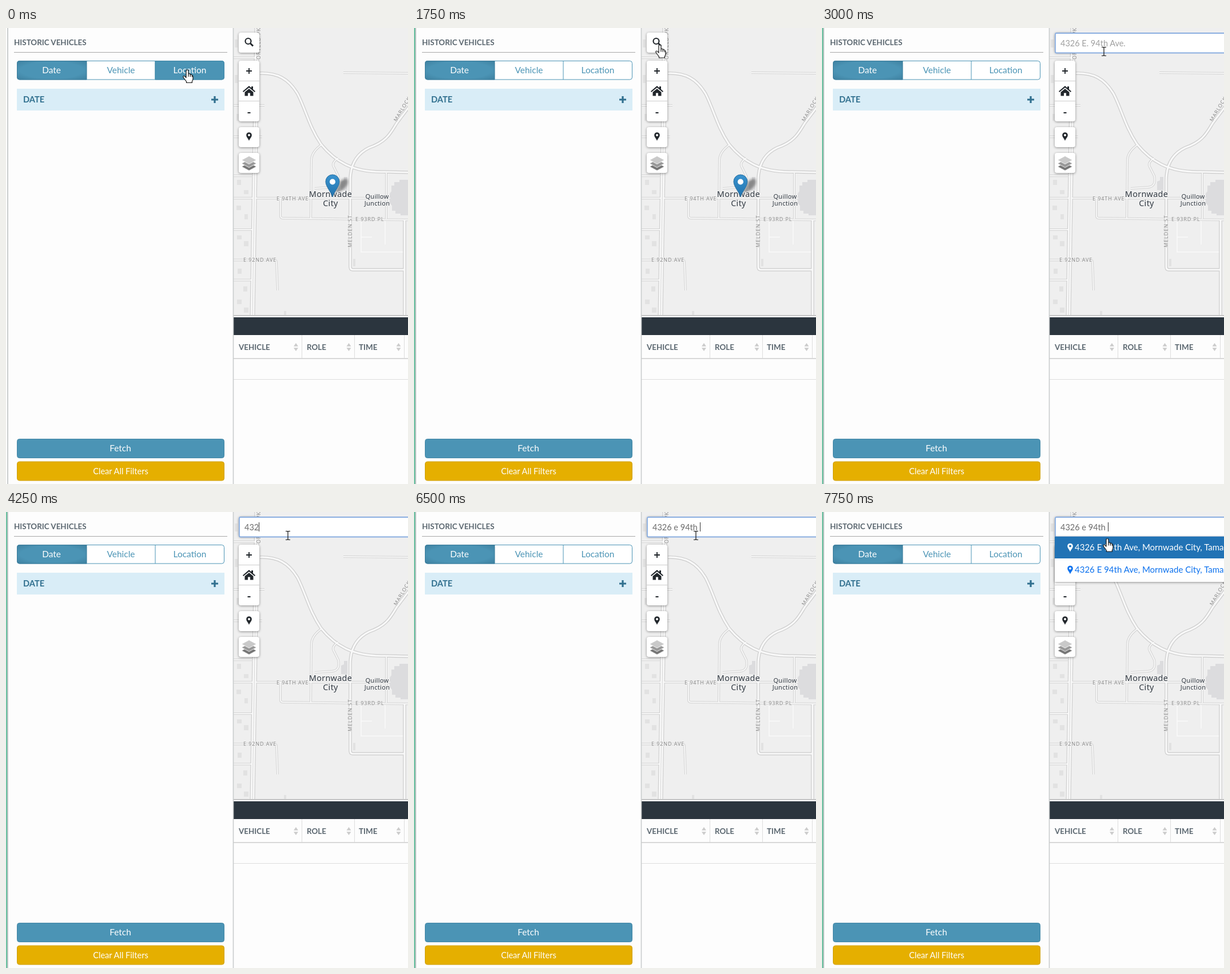
Recreate the animation shown at these times as an HTML page. Size 703 px wide and 796 px high, loop 8000 ms.

```html
<!DOCTYPE html>
<html lang="en">
<head>
<meta charset="utf-8">
<title>Historic vehicles</title>
<style>
html, body { margin: 0; width: 100%; height: 100%; overflow: hidden; background: #fdfdfd; }
svg { display: block; width: 703px; height: 796px; }
text { font-family: Lato, "Open Sans", sans-serif; white-space: pre; }
.mid { text-anchor: middle; }
.btn { font-size: 15.4px; fill: #4b94b5; }
.white { fill: #fff; }
.head { font-size: 13.4px; font-weight: 700; fill: #5b6770; }
.field { font-size: 14.5px; }
.item { font-size: 15px; }
.map text { font-family: "Noto Sans", sans-serif; fill: #333b44; letter-spacing: .3px;
  paint-order: stroke; stroke: #efefef; stroke-width: 2px; }
.map .street { font-size: 9px; letter-spacing: .9px; fill: #8c8c8c; }
.ctl { fill: #fff; filter: drop-shadow(0 1px 2px #0006); }
.ink { fill: #22272c; }

.hover, .marker, .stripe, .input, .field-box, .hand, .beam, .list, .picked {
  animation: 8s step-end infinite;
}
.hover { animation-name: hover; }
.marker { animation-name: marker; }
.stripe { animation-name: stripe; }
.input { animation-name: input; }
.field-box { animation-name: grow; }
.hand { animation-name: hand; }
.beam { animation-name: beam; }
.list { animation-name: list; }
.picked { animation-name: picked; }

@keyframes hover { 0% { opacity: 1; } 12.5%, 100% { opacity: 0; } }
@keyframes marker { 0% { opacity: 1; } 25%, 100% { opacity: 0; } }
@keyframes stripe { 0% { fill: #fdfdfd; } 21.875%, 100% { fill: #6ec2a2; } }
@keyframes input { 0% { opacity: 0; } 25%, 100% { opacity: 1; } }
@keyframes grow { 0% { width: 237px; } 28.125%, 100% { width: 310px; } }
@keyframes list { 0% { opacity: 0; } 84.375%, 100% { opacity: 1; } }
@keyframes picked { 0% { opacity: 0; } 96.875%, 100% { opacity: 1; } }
@keyframes hand {
  0% { transform: translate(317px, 73px); opacity: 1; }
  9.375% { transform: translate(366px, 60px); }
  12.5% { transform: translate(418px, 35.5px); }
  15.625% { transform: translate(428px, 33px); }
  18.75% { transform: translate(430px, 29.5px); opacity: 1; }
  25% { transform: translate(499px, 46.5px); opacity: 0; }
  96.875%, 100% { transform: translate(499px, 46.5px); opacity: 1; }
}
@keyframes beam {
  0% { transform: translate(432px, 40px); opacity: 0; }
  25% { transform: translate(432px, 40px); opacity: 1; }
  28.125% { transform: translate(493px, 41px); opacity: 0; }
  31.25% { transform: translate(493px, 41px); opacity: 1; }
  96.875%, 100% { transform: translate(493px, 41px); opacity: 0; }
}
</style>
</head>
<body>
<svg viewBox="0 0 703 796">
  <defs>
    <clipPath id="mapArea"><path d="M398 0H703V501H398Z"/></clipPath>
    <radialGradient id="pressed" cx=".5" cy=".5" r=".75">
      <stop offset=".6" stop-color="#4b94b5"/><stop offset="1" stop-color="#3b7c9b"/>
    </radialGradient>
    <linearGradient id="blue" x2="0" y2="1">
      <stop stop-color="#3a93cf"/><stop offset="1" stop-color="#2273ad"/>
    </linearGradient>
    <filter id="blur"><feGaussianBlur stdDeviation="2"/></filter>
    <path id="pin" fill-rule="evenodd" d="M0 7.5C-1 4-4.8 1.2-4.8-2.5A4.8 4.8 0 0 1 4.8-2.5C4.8 1.2 1 4 0 7.5ZM-2-2.5A2 2 0 0 0 2-2.5A2 2 0 0 0-2-2.5Z"/>
    <path id="sort" fill="#ccc" d="M-4-1.3L0-7L4-1.3ZM-4 1.3L0 7L4 1.3Z"/>
    <g id="major">
      <path d="M444 79C474 78 494 88 510 115C524 142 530 172 551 203C575 232 605 252 660 251L703 252"/>
      <path d="M697 422H607Q602 422 602 417V266C602 240 612 220 635 209C668 198 674 180 684 165L709 132"/>
      <path d="M697 501V335"/>
    </g>
    <g id="minor">
      <path d="M590 78L703 79"/>
      <path d="M553 203Q535 215 534 230L533 332"/>
      <path d="M581 227Q569 235 573 242L581 258Q585 277 570 278L540 280"/>
      <path d="M398 297H601M601 297H672"/>
      <path d="M480 298V328Q480 332 485 332L703 335"/>
      <path d="M665 253V333"/>
      <path d="M398 405H470Q473 405 473 410L475 458"/>
      <path d="M398 258H430M398 352H432M398 440H430M398 135H452M398 190H448M398 52H440"/>
    </g>
  </defs>

  <!-- filter panel -->
  <rect width="703" height="796" fill="#fdfdfd"/>
  <rect class="stripe" width="2.5" height="796"/>
  <path d="M3 0V796" stroke="#a9adae" stroke-width="1.2"/>
  <text class="head" x="14" y="30">HISTORIC VEHICLES</text>
  <path d="M14 42.5H387" stroke="#a8a8a8"/>
  <rect x="19.5" y="57.5" width="362" height="32.5" rx="4" fill="#fff" stroke="#4b94b5"/>
  <path d="M141 57.5H23.5Q19.5 57.5 19.5 61.5V86Q19.5 90 23.5 90H141Z" fill="url(#pressed)" stroke="#3b7c9b"/>
  <path d="M261 57V90" stroke="#4b94b5"/>
  <text class="btn mid white" x="79.5" y="79">Date</text>
  <text class="btn mid" x="201" y="79">Vehicle</text>
  <text class="btn mid" x="321.5" y="79">Location</text>
  <g class="hover">
    <path d="M261 57.5H377.5Q381.5 57.5 381.5 61.5V86Q381.5 90 377.5 90H261Z" fill="#4b94b5" stroke="#3f87a8"/>
    <text class="btn mid white" x="321.5" y="79">Location</text>
  </g>
  <rect x="19" y="106" width="363" height="38" fill="#d9edf7"/>
  <text x="30" y="130" font-size="14.7" font-weight="700" fill="#31708f">DATE</text>
  <path d="M359 125H371M365 119V131" stroke="#31708f" stroke-width="3.2"/>
  <rect x="19.5" y="717.5" width="362" height="33" rx="4" fill="#4b94b5" stroke="#4286a5"/>
  <text class="btn mid white" x="200" y="739">Fetch</text>
  <rect x="19.5" y="757" width="362" height="33" rx="4" fill="#e5af00" stroke="#cf9f06"/>
  <text class="btn mid white" x="200.5" y="778.5" style="font-size:14.6px">Clear All Filters</text>

  <!-- map -->
  <g class="map" clip-path="url(#mapArea)">
    <rect x="398" width="305" height="501" fill="#efefef"/>
    <g fill="#e2e2e2">
      <path d="M404 265h7v9h-7zM416 283h8v7h-8zM403 310h8v8h-8zM417 325h6v9h-6zM404 362h8v7h-8zM416 372h8v9h-8zM405 420h7v9h-7zM415 451h7v9h-7zM404 474h8v8h-8zM416 488h8v9h-8zM403 150h4v12h-4zM400 20h5v14h-5zM400 82h5v14h-5z"/>
      <path d="M607 403h4v13h-4zM486 494h4v7h-4z"/>
      <path fill="#dcdcde" d="M586 268l5-2v-6h6v23h-11zM703 265h-15v4h-9v6h-5v10l-3 4v17l4 4v9h6v5h9v3h13z"/>
    </g>
    <path d="M621 338V391H697M663 336V378M621 365H640" fill="none" stroke="#fafafa" stroke-width="1.5"/>
    <g fill="none">
      <path id="avenue" d="M439 0L435 250L431 501" stroke="#cfcfcf" stroke-width="9"/>
      <use href="#minor" stroke="#d2d2d2" stroke-width="4"/>
      <use href="#major" stroke="#cbcbcb" stroke-width="5.5"/>
      <path d="M439 0L435 250L431 501" stroke="#f8f8f8" stroke-width="6.6"/>
      <use href="#minor" stroke="#f8f8f8" stroke-width="2"/>
      <use href="#major" stroke="#f8f8f8" stroke-width="3.2"/>
      <path d="M439 0L435 250L431 501" stroke="#d6d6d6"/>
    </g>
    <text class="street" x="473" y="300.5">E 94TH AVE</text>
    <text class="street" x="611" y="337">E 93RD PL</text>
    <text class="street" x="415" y="408">E 92ND AVE</text>
    <text class="street" transform="translate(605 383) rotate(-90)">MELDEN ST</text>
    <text class="street" transform="translate(683 164) rotate(-59)">MARLOCK RD</text>
    <text class="street" transform="translate(444.5 55) rotate(-90)">ORVELD PKWY</text>
    <g class="marker">
      <path d="M572 293L585 267Q596 259 598 267Q599 277 583 286Z" fill="#000" opacity=".38" filter="url(#blur)"/>
    </g>
    <g class="mid">
      <text x="567.5" y="294.5" font-size="14.4">Mornwade</text>
      <text x="567.5" y="311" font-size="14.4">City</text>
      <text x="649" y="297.5" font-size="11">Quillow</text>
      <text x="649" y="309.5" font-size="11">Junction</text>
    </g>
    <g class="marker">
      <path d="M571 295C568 285 559 277 559 268A12 12 0 0 1 583 268C583 277 574 285 571 295Z" fill="url(#blue)" stroke="#2a6f9f"/>
      <circle cx="571" cy="268.5" r="5" fill="#fff"/>
    </g>
  </g>

  <!-- map controls -->
  <rect class="ctl" x="407" y="8" width="36" height="35" rx="4"/>
  <rect class="ctl" x="407" y="57" width="36" height="106" rx="4"/>
  <rect class="ctl" x="407" y="173" width="36" height="35" rx="4"/>
  <rect class="ctl" x="407" y="218" width="36" height="35" rx="4"/>
  <path d="M407 92.5H443M407 127.5H443" stroke="#ccc"/>
  <g fill="none" stroke="#22272c">
    <circle cx="423.5" cy="23" r="5" stroke-width="2.2"/>
    <path d="M427.5 27L432 31.5" stroke-width="3"/>
    <path d="M420 75H430M425 70V80M422.5 148H427.5" stroke-width="1.9"/>
  </g>
  <path class="ink" d="M414 110.5L425 101L429 104.4V102H432V107L436 110.5L434.8 112L425 104L415.2 112ZM417.5 112L425 106L432.5 112V118.5H427V113.5H423V118.5H417.5Z"/>
  <use class="ink" href="#pin" x="425" y="189.5"/>
  <g stroke="#fff" stroke-width=".8">
    <path fill="#777" d="M412 242L425 235L438 242L425 249Z"/>
    <path fill="#999" d="M412 236.5L425 229.5L438 236.5L425 243.5Z"/>
    <path fill="#c9c9c9" d="M412 230.5L425 223.5L438 230.5L425 237.5Z"/>
  </g>

  <!-- results table -->
  <path d="M398 502H703" stroke="#c6c6c6" stroke-width="2"/>
  <rect x="398" y="505" width="305" height="31" fill="#2b353e"/>
  <path d="M517.5 536V577M609.5 536V577M696.5 536V577M398 613.5H703" stroke="#ddd"/>
  <path d="M398 577H703" stroke="#d8d8d8" stroke-width="1.8"/>
  <text class="head" x="407" y="561.5">VEHICLE</text>
  <text class="head" x="526" y="561.5">ROLE</text>
  <text class="head" x="617" y="561.5">TIME</text>
  <use href="#sort" x="507" y="557"/>
  <use href="#sort" x="599.5" y="557"/>
  <use href="#sort" x="686.5" y="557"/>
  <path d="M397.5 0V796" stroke="#c9cccd" stroke-width="1.6"/>

  <!-- address search -->
  <g class="input">
    <rect class="field-box" x="408" y="9" width="237" height="34.5" rx="2" fill="#fff" stroke="#8aaee0" stroke-width="1.8"/>
    <text class="field" id="typed" x="417" y="31.5"></text>
    <path id="caret" d="M.5 18V34" stroke="#333"/>
  </g>
  <g class="list">
    <rect class="ctl" x="407" y="43" width="310" height="79"/>
    <g fill="#0d72ee">
      <use href="#pin" x="434" y="62"/>
      <text class="item" x="442" y="67">4326 E 94th Ave, Mornwade City, Tamarro</text>
      <use href="#pin" x="434" y="101"/>
      <text class="item" x="442" y="106">4326 E 94th Ave, Mornwade City, Tamarro</text>
    </g>
  </g>
  <g class="picked white">
    <rect x="407" y="43" width="296" height="38" fill="#2273b5"/>
    <use href="#pin" x="434" y="62"/>
    <text class="item" x="442" y="67">4326 E 94th Ave, Mornwade City, Tamarro</text>
  </g>

  <!-- pointers -->
  <g class="beam">
    <path d="M-4-7.5H-1L0-6.5L1-7.5H4M0-6.5V6.5M-4 7.5H-1L0 6.5L1 7.5H4" fill="none" stroke="#111" stroke-width="1.2"/>
  </g>
  <g class="hand">
    <path d="M-2 2Q-2 0 0 0Q2 0 2 2V7.5Q3 6.3 4 6.8Q5.3 7.2 5.3 8.6Q6.4 7.5 7.4 8.2Q8.4 8.8 8.4 10Q10 9.8 10 12V15.5Q10 18 8.4 20V22.5H-1.5V20.5L-6 14.5Q-8 12-6.7 11Q-5.2 10.2-3.6 12L-2 13.7ZM2 7.5V12M5.3 8.6V12.2M8.4 10V12.5" fill="#fff" stroke="#111" stroke-width="1.2" stroke-linejoin="round"/>
  </g>
</svg>
<script>
const LOOP = 8000;
const ADDRESS = "4326 e 94th ";
// [start ms, typed characters, caret shown]
const steps = [
  [0, 0, true], [3000, 0, false], [3500, 1, true], [4000, 2, true],
  [4250, 3, true], [4500, 4, true], [4750, 5, true], [5000, 7, true],
  [5500, 7, false], [6000, 9, true], [6500, 12, true]
];
const typed = document.getElementById("typed");
const caret = document.getElementById("caret");
let shown;

function draw(now) {
  const time = now % LOOP;
  const step = steps.findLast(s => s[0] <= time) || steps[0];
  if (step !== shown) {
    shown = step;
    const [, count, caretOn] = step;
    typed.textContent = count ? ADDRESS.slice(0, count) : "4326 E. 94th Ave.";
    typed.setAttribute("fill", count ? "#6c6c6c" : "#a0a0a0");
    const width = count ? Math.round(typed.getComputedTextLength()) : 0;
    caret.setAttribute("transform", `translate(${417 + width} 0)`);
    caret.setAttribute("visibility", caretOn ? "visible" : "hidden");
  }
  requestAnimationFrame(draw);
}
draw(performance.now());
</script>
</body>
</html>
```
